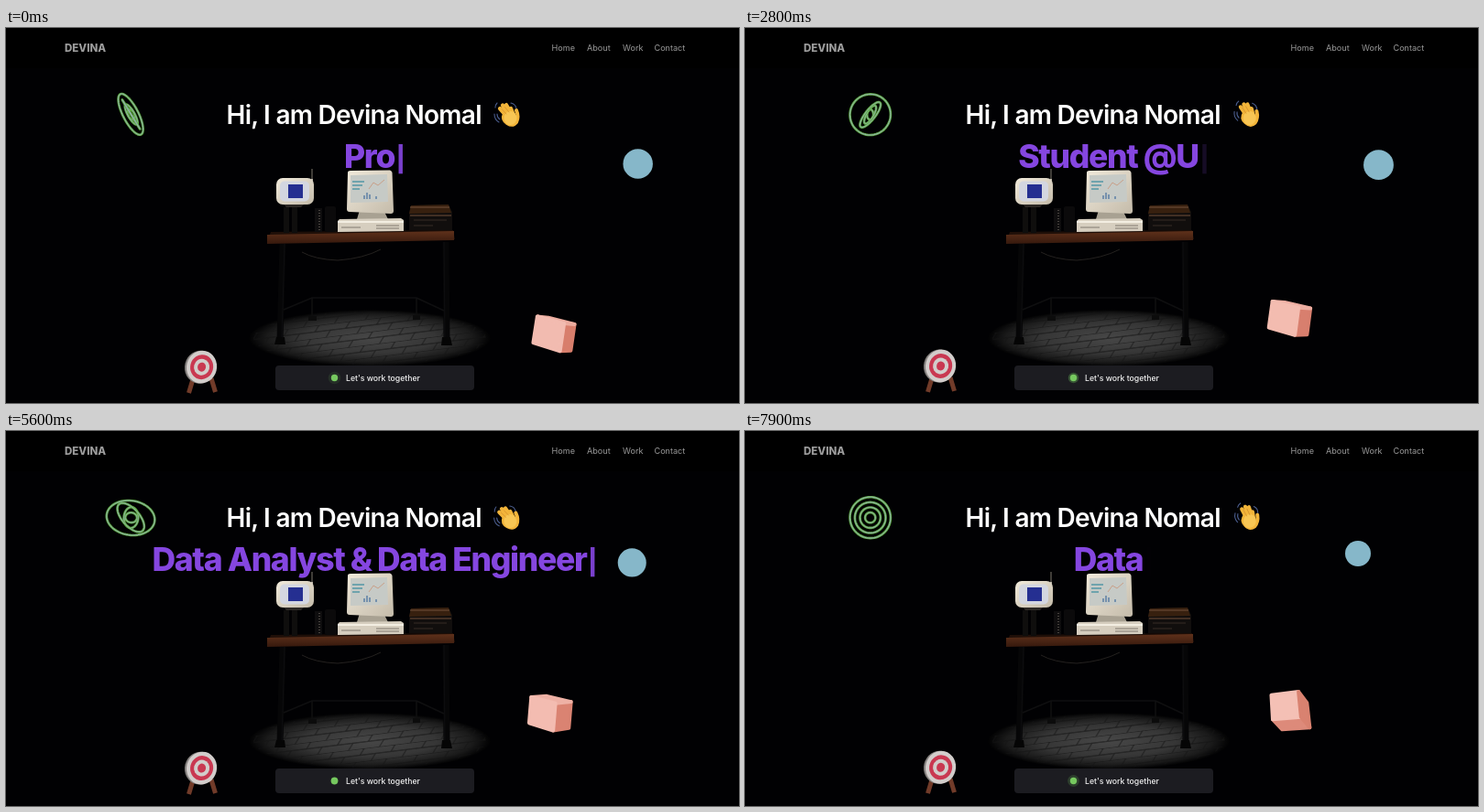
Animation of 800x410 px, one loop 8000 ms. Source, as an HTML page:

```html
<!DOCTYPE html>
<html lang="en">
<head>
<meta charset="utf-8">
<title>Portfolio</title>
<style>
  html, body { margin: 0; width: 100%; height: 100%; overflow: hidden; background: #000; }
  svg { display: block; width: 100%; height: 100%; font-family: Inter, Roboto, sans-serif; }
  .nav { font-size: 9.1px; fill: #999; }
  #typed { font-size: 35.5px; font-weight: 800; letter-spacing: -1.35px; fill: #8546e0; text-anchor: middle; white-space: pre; }
  #cursor { font-size: 27px; letter-spacing: 0; }
  .round { fill: none; stroke-linecap: round; stroke-linejoin: round; }
</style>
</head>
<body>
<svg viewBox="0 0 800 410">
  <defs>
    <radialGradient id="light">
      <stop offset="0" stop-color="#474747"/><stop offset=".55" stop-color="#363636"/>
      <stop offset=".85" stop-color="#1a1a1a"/><stop offset="1" stop-color="#010102"/>
    </radialGradient>
    <pattern id="bricks" width="34" height="14" patternUnits="userSpaceOnUse" patternTransform="rotate(-7) skewX(-38)">
      <path d="M0 0H34M0 7H34M6 0V7M23 7V14" fill="none" stroke="#141414" stroke-width=".9"/>
    </pattern>
    <linearGradient id="wood" x2="0" y2="1">
      <stop offset="0" stop-color="#5f311b"/><stop offset="1" stop-color="#36190d"/>
    </linearGradient>
    <linearGradient id="cream" x2="1" y2="1">
      <stop offset="0" stop-color="#f1eadb"/><stop offset="1" stop-color="#c4bbaa"/>
    </linearGradient>
  </defs>
  <rect width="800" height="410" fill="#010103"/>
  <rect width="800" height="44"/>

  <text x="64" y="25.5" font-size="11.5" font-weight="800" fill="#9c9c9c">DEVINA</text>
  <g class="nav">
    <text x="595.5" y="25">Home</text><text x="634" y="25">About</text>
    <text x="673" y="25">Work</text><text x="707.5" y="25">Contact</text>
  </g>
  <text x="240.5" y="104.5" font-size="28" font-weight="600" letter-spacing="-.75" fill="#fff">Hi, I am Devina Nomal</text>

  <g id="hand" class="round">
    <path d="M551 82q5 1 6 6M533 94q0 6 5 9M536 94q0 4 3 6M534 87q0-3 2-5" stroke="#4a5c8c" stroke-width="1.1"/>
    <path d="M547 97L539 88M549 95L542 84.500M552 94L546 84M554 95L551 88" stroke="#f3b53a" stroke-width="4.200"/>
    <path d="M544 94q-3 6 3 10q6 4 10-1q3-6 0-13" stroke="#f3b53a" stroke-width="4"/>
    <ellipse cx="550.500" cy="98.500" rx="7" ry="7.500" fill="#f8c654"/>
    <path d="M546 94L541 88.500M549 92L544.500 86.500" stroke="#ca842b" stroke-width=".6"/>
  </g>

  <text id="typed" x="402.5" y="153"><tspan id="words"></tspan><tspan id="cursor" dx="1.5">|</tspan></text>

  <!-- floor and desk -->
  <ellipse cx="397" cy="339" rx="132" ry="31" fill="url(#light)"/>
  <ellipse cx="397" cy="339" rx="127" ry="29" fill="url(#bricks)"/>
  <path d="M302 236L299 342M480 234L481 342" stroke="#060607" stroke-width="7"/>
  <path d="M304 236L301 342M478 234L479 342" stroke="#0e0e10" stroke-width="1"/>
  <path d="M295 338h9l1 8h-12zM476 338h9l2 9h-12z" fill="#050505"/>
  <path d="M303 308L334 295H448L478 309M334 295V316M448 295V314" fill="none" stroke="#0f0f10" stroke-width="1.600"/>
  <path d="M330 315h9v5h-9zM444 314h8v5h-8z" fill="#0c0c0c"/>
  <path d="M323 245Q337 253 362 254Q390 252 409 242" fill="none" stroke="#24211f" stroke-width="1"/>
  <path d="M289 223L488 221 490 231 285 234z" fill="#1f0f08"/>
  <path d="M285 226L489 222V232L285 236z" fill="url(#wood)"/>

  <!-- sign -->
  <path d="M334 154V188" stroke="#6b665d" stroke-width="1.2"/>
  <path d="M334 165V188" stroke="#b9b3a6" stroke-width="2"/>
  <path d="M303 193h22l-3 3h-16z" fill="#2c2825"/>
  <rect x="295" y="164" width="41" height="29" rx="7" fill="url(#cream)"/>
  <rect x="299" y="167.500" width="32" height="22" rx="5" fill="#d3d6e0"/>
  <rect x="308" y="171" width="16" height="15" fill="#252f91"/>
  <path d="M306 196V224M315 196V224" stroke="#0f0e0d" stroke-width="6"/>
  <rect x="337" y="197" width="8" height="26" fill="#0e0d0e"/>
  <path d="M342 199V222" stroke="#48433f" stroke-width="2" stroke-dasharray="1 2"/>
  <rect x="348" y="195" width="12" height="28" rx="2" fill="#0b0a0b"/>

  <!-- computer -->
  <path d="M386 199h26l5 10h-34z" fill="#a8a192"/>
  <path d="M373 158Q373 156 376 156L419 155.500Q421 156 421.500 158L423 200Q423 203 420 203L375 201Q372 201 372 198z" fill="url(#cream)"/>
  <path d="M376 161L416 160 417 190 376 191z" fill="#c6cac6"/>
  <path d="M378 168h13M378 172h11M378 176h8" stroke="#6fa3ad" stroke-width="2"/>
  <path d="M396 176l5-7 5 3 7-6" fill="none" stroke="#c99a80" stroke-width=".9"/>
  <path d="M391 187V183M394 187V180M397 187V182M404 187V184" stroke="#5c7fa5" stroke-width="1.500"/>
  <path d="M364 209L431 208 434 210V222L362 223V211z" fill="#d6cebf"/>
  <path d="M362 212H434" stroke="#f3eee2" stroke-width="2"/>
  <path d="M366 218h21M404 216h25M404 219h25" stroke="#817a70" stroke-width="1"/>

  <!-- recorder -->
  <path d="M442 194L483 193 487 201V221L440 221V201z" fill="#110e0d"/>
  <path d="M442 194L483 193 486 202 440 203z" fill="#37200f"/>
  <path d="M441 196H484M441 205H486" stroke="#73503a" stroke-width="1"/>
  <path d="M445 210H481M445 216H466" stroke="#241d19" stroke-width="2"/>

  <!-- floating objects -->
  <g id="rings" class="round"></g>
  <circle id="badge" fill="#86b7c9"/>
  <g id="cube" stroke-width="4" stroke-linejoin="round"></g>
  <g id="target">
    <path d="M204 384L199.500 399M224 383L228.500 398" stroke="#713b29" stroke-width="5"/>
    <g transform="rotate(14 213 371)">
      <ellipse cx="211.500" cy="371" rx="16.500" ry="18" fill="#85817f"/>
      <ellipse cx="213.500" cy="370.500" rx="16.500" ry="18" fill="#d2cdcb"/>
      <ellipse cx="213.500" cy="370.500" rx="12.500" ry="13.500" fill="#c93851"/>
      <ellipse cx="213.500" cy="370.500" rx="8.500" ry="9" fill="#d2cdcb"/>
      <ellipse cx="213.500" cy="370.500" rx="4.500" ry="5" fill="#c93851"/>
    </g>
  </g>

  <rect x="294" y="369" width="217" height="27" rx="4" fill="#1c1c21"/>
  <circle id="ping" cx="358.5" cy="382.500" fill="#6fc05b"/>
  <circle cx="358.5" cy="382.500" r="3.700" fill="#76c85f"/>
  <text x="371" y="386" font-size="8.700" font-weight="500" fill="#f2f2f2">Let's work together</text>
</svg>
<script>
const LOOP = 8000, FOCAL = 424, TAU = Math.PI * 2;
const { sin, cos, min, max, floor, abs } = Math;
const el = id => document.getElementById(id);
const clamp = v => max(0, min(1, v));
const mod = (a, n) => (a % n + n) % n;
const easeOut = p => 1 - (1 - clamp(p)) ** 2;
const set = (node, attrs) => { for (const k in attrs) node.setAttribute(k, attrs[k]); };
const addPath = parent => parent.appendChild(document.createElementNS('http://www.w3.org/2000/svg', 'path'));

const rotX = ([x, y, z], a) => [x, y * cos(a) - z * sin(a), y * sin(a) + z * cos(a)];
const rotY = ([x, y, z], a) => [x * cos(a) + z * sin(a), y, z * cos(a) - x * sin(a)];
const rotZ = ([x, y, z], a) => [x * cos(a) - y * sin(a), x * sin(a) + y * cos(a), z];
const spin = (p, a) => rotX(rotY(p, a), -a);
const project = ([x, y, z], cx, cy) => {
  const s = FOCAL / (FOCAL - z);
  return [400 + (cx - 400 + x) * s, 205 + (cy - 205 - y) * s];
};
const outline = pts => 'M' + pts.map(p => p.map(v => v.toFixed(2)).join(' ')).join('L') + 'Z';

// Each ring has a green tube with a cool highlight
const rings = [5.6, 11.2, 16.8, 22.4].map(radius => {
  const tube = addPath(el('rings')), shine = addPath(el('rings'));
  set(tube, { stroke: '#62b045', 'stroke-width': 2.6 });
  set(shine, { stroke: '#93adb5', 'stroke-width': 1 });
  return { radius, paths: [tube, shine] };
});

function drawRings(t) {
  const phase = mod(t - 1615, 3450);
  rings.forEach(({ radius, paths }, i) => {
    const a = TAU * easeOut((phase - i * 150) / 2500);
    const pts = Array.from({ length: 64 }, (_, k) => {
      const u = k / 64 * TAU;
      return project(spin([radius * cos(u), radius * sin(u), 0], a), 136.7, 94.7);
    });
    paths.forEach(p => set(p, { d: outline(pts) }));
  });
}

const faces = [0, 1, 2].flatMap(axis => [-1, 1].map(side => ({ axis, side, path: addPath(el('cube')) })));

function drawCube(t) {
  const a = TAU * easeOut(mod(t - 500, 3000) / 2500);
  const cx = 593.5 + 4.5 * (1 - t / 5000) ** 2, cy = 306 + 28 * (1 - t / 7500) ** 2;
  const turn = p => rotZ(rotX(rotY(spin(p, a), -.85), -.1), -.2);
  for (const { axis, side, path } of faces) {
    const point = (u, v, w) => {
      const p = [];
      p[axis] = u; p[(axis + 1) % 3] = v; p[(axis + 2) % 3] = w;
      return turn(p);
    };
    const n = point(side, 0, 0), h = 14.3;
    const toCamera = (400 - cx) * n[0] + (cy - 205) * n[1] + FOCAL * n[2];
    const corners = [[-h, -h], [h, -h], [h, h], [-h, h]].map(([v, w]) => project(point(side * h, v, w), cx, cy));
    const l = clamp(.4 - .5 * n[0] + .35 * n[1]);
    const color = `rgb(${214 + 34 * l},${122 + 78 * l},${104 + 86 * l})`;
    set(path, { d: outline(corners), fill: color, stroke: color, display: toCamera > h ? 'inline' : 'none' });
  }
}

const [FIRST, SECOND, THIRD] = ['Pro', 'Student @UF', 'Data Analyst & Data Engineer'];
function typedText(t) {
  const typing = (s, start) => s.slice(0, max(0, floor((t - start) / 53)));
  const erasing = (s, start) => s.slice(0, max(0, s.length - max(0, floor((t - start) / 48))));
  if (t < 190) return erasing(FIRST, 0);
  if (t < 2730) return typing(SECOND, 190);
  if (t < 3270) return erasing(SECOND, 2730);
  return t < 6730 ? typing(THIRD, 3270) : erasing(THIRD, 6730);
}

const WAVE = [0, 14, -8, 14, -4, 10, 0, 0, 0, 0, 0];
function waveAngle(t) {
  const k = mod(t - 150, 2500) / 250, i = floor(k);
  return WAVE[i] + (WAVE[i + 1] - WAVE[i]) * (k - i);
}

function draw(t) {
  drawRings(t);
  drawCube(t);

  const drift = ((t - 1900) / 6000) ** 2;
  set(el('badge'), { cx: 692 - 23 * drift, cy: 150 - 16 * drift, r: 16.5 - 2.5 * drift });

  const bob = easeOut(1 - abs(mod(t - 600, 3000) / 1500 - 1));
  set(el('target'), { transform: `translate(0 ${5.5 - 8.5 * bob})` });
  set(el('hand'), { transform: `rotate(${waveAngle(t)} 551 100)` });

  el('words').textContent = typedText(t);
  set(el('cursor'), { opacity: (1 - mod(t + 30, 800) / 800) ** 2.4 });

  const grow = 1 - (1 - clamp(mod(t - 580, 1000) / 750)) ** 2.3;
  set(el('ping'), { r: 3.7 * (1 + grow), opacity: .75 * (1 - grow) });
}

const start = performance.now();
function tick() {
  draw((performance.now() - start) % LOOP);
  requestAnimationFrame(tick);
}
tick();
</script>
</body>
</html>
```
